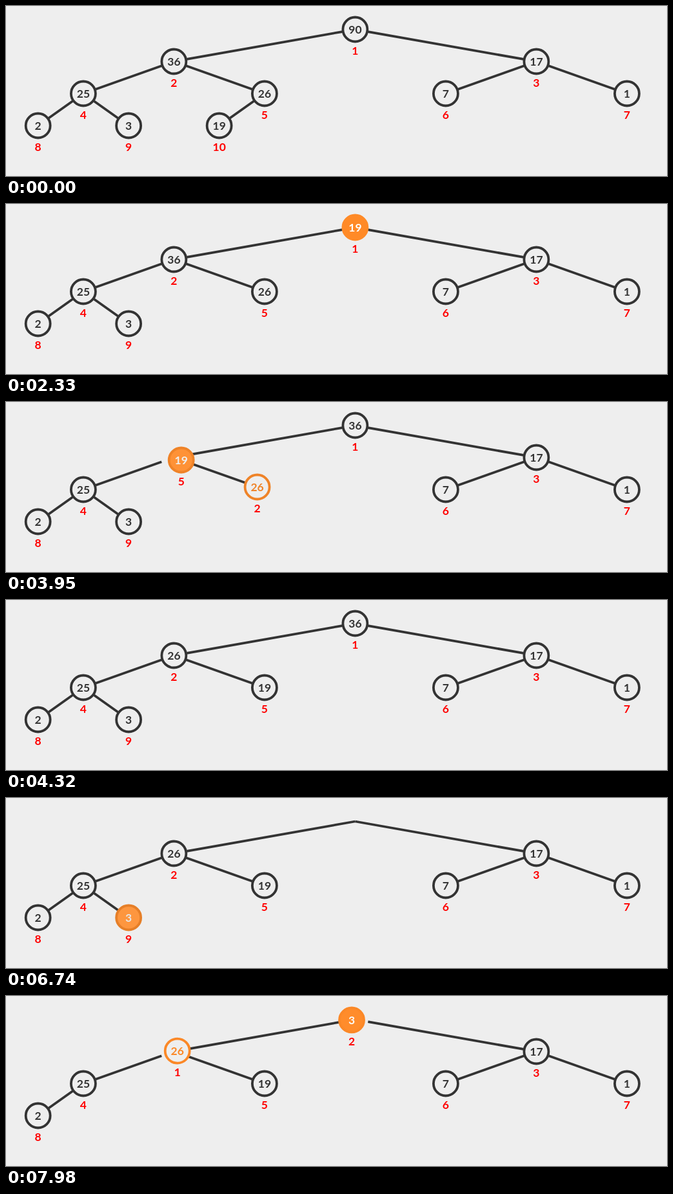
These frames come from a looping animation (1025 by 265 pixels, 8 s). An HTML page:

```html
<!DOCTYPE html>
<html lang="en">
<head>
<meta charset="utf-8">
<title>Heap: extract max</title>
<style>
  html, body { margin: 0; width: 100%; height: 100%; overflow: hidden; background: #eee; }
  svg { display: block; width: 1025px; height: 265px; }
  line { stroke: #333; stroke-width: 3.8; }
  text { font-family: Lato, "Noto Sans CJK SC", sans-serif; font-weight: 700; text-anchor: middle; }
  .label { fill: #f00; }
</style>
</head>
<body>
<svg viewBox="0 0 1025 265"><g id="edges"></g><g id="nodes"></g></svg>
<script>
const LOOP = 8000, STEP = 500, RADIUS = 19, STROKE = 3.8, GAP = 20.3, FONT = 17.5;
const DARK = [51, 51, 51], PAPER = [238, 238, 238], ORANGE = [255, 138, 39], WHITE = [255, 255, 255];

// Looks: stroke, fill, text
const PLAIN = [DARK, PAPER, DARK];
const RING = [ORANGE, PAPER, ORANGE];
const SOLID = [ORANGE, ORANGE, WHITE];

const START = [90, 36, 17, 25, 26, 7, 1, 2, 3, 19];

// Each step: start time, node changes by value, edge changes by child slot
const STEPS = [
  [315, { 90: { look: SOLID } }],
  [815, { 90: { size: 0 } }, { root: 0 }],
  [1315, { 19: { look: SOLID } }],
  [1815, { 19: { slot: 1 } }, { root: 1, drop: 10 }],
  [2315, { 36: { look: RING } }],
  [2815, { 19: { slot: 2, look: PLAIN }, 36: { slot: 1, look: PLAIN } }, { swap: 2 }],
  [3315, { 19: { look: SOLID }, 26: { look: RING } }],
  [3815, { 19: { slot: 5, look: PLAIN }, 26: { slot: 2, look: PLAIN } }, { swap: 5 }],
  [5397, { 36: { look: SOLID } }],
  [5897, { 36: { size: 0 } }, { root: 0 }],
  [6397, { 3: { look: SOLID } }],
  [6897, { 3: { slot: 1 } }, { root: 1, drop: 9 }],
  [7397, { 26: { look: RING } }],
  [7897, { 3: { slot: 2, look: PLAIN }, 26: { slot: 1, look: PLAIN } }, { swap: 2 }]
];

const mix = (a, b, p) => a + (b - a) * p;
const mixAll = (a, b, p) => a.map((v, i) => mix(v, b[i], p));
const rgb = c => `rgb(${c.map(Math.round)})`;
const ease = p => p < 0.5 ? 4 * p ** 3 : 1 - 4 * (1 - p) ** 3;

function place(slot) {
  const depth = Math.floor(Math.log2(slot)), row = 2 ** depth;
  return [(slot - row + 0.5) / row * 1124 - 20.6, 36.5 + 50 * depth];
}

function toward(a, b, dist) {
  const len = Math.hypot(b[0] - a[0], b[1] - a[1]);
  return mixAll(a, b, dist / len);
}

function add(parent, tag, cls) {
  const el = document.createElementNS("http://www.w3.org/2000/svg", tag);
  if (cls) el.setAttribute("class", cls);
  return document.getElementById(parent).appendChild(el);
}

function set(el, attrs) {
  for (const key in attrs) el.setAttribute(key, attrs[key]);
}

const lines = START.slice(1).map(() => add("edges", "line"));
const parts = START.map(value => {
  const part = { circle: add("nodes", "circle"), text: add("nodes", "text"), label: add("nodes", "text", "label") };
  part.text.textContent = value;
  return part;
});

function stateAt(t) {
  const nodes = START.map((value, i) => ({ value, slot: i + 1, pos: place(i + 1), look: PLAIN, size: 1 }));
  const edges = { root: 1, swap: {}, length: {} };
  for (const [start, changes, links = {}] of STEPS) {
    if (t <= start) break;
    const p = ease(Math.min(1, (t - start) / STEP));
    for (const node of nodes) {
      const to = changes[node.value];
      if (!to) continue;
      if (to.slot) {
        node.slot = to.slot;
        node.pos = mixAll(node.pos, place(to.slot), p);
      }
      if (to.look) node.look = node.look.map((c, i) => mixAll(c, to.look[i], p));
      if ("size" in to) node.size = mix(node.size, to.size, p);
    }
    if ("root" in links) edges.root = mix(edges.root, links.root, p);
    if (links.drop) edges.length[links.drop] = 1 - p;
    if (links.swap) edges.swap[links.swap] = p;
  }
  return { nodes, edges };
}

function drawEdge(line, slot, edges) {
  const up = slot >> 1, a = place(up), b = place(slot);
  const from = toward(a, b, up === 1 ? GAP * edges.root : GAP);
  const to = mixAll(from, toward(b, a, GAP), edges.length[slot] ?? 1);
  const p = edges.swap[slot] || 0;
  const [x1, y1] = mixAll(from, to, p), [x2, y2] = mixAll(to, from, p);
  set(line, { x1, y1, x2, y2 });
}

function drawNode({ circle, text, label }, { pos: [x, y], look, size, slot }) {
  const font = `${FONT * size}px`;
  const visibility = size < 0.03 ? "hidden" : "visible";
  set(circle, {
    cx: x, cy: y, r: RADIUS * size, "stroke-width": STROKE * size,
    stroke: rgb(look[0]), fill: rgb(look[1]), visibility
  });
  set(text, { x, y: y + 6.2, "font-size": font, fill: rgb(look[2]), visibility });
  set(label, { x, y: y + 39.2, "font-size": font, visibility });
  if (label.textContent !== String(slot)) label.textContent = slot;
}

const begin = performance.now();
function draw() {
  const { nodes, edges } = stateAt((performance.now() - begin) % LOOP);
  lines.forEach((line, i) => drawEdge(line, i + 2, edges));
  nodes.forEach((node, i) => drawNode(parts[i], node));
  requestAnimationFrame(draw);
}
draw();
</script>
</body>
</html>
```
